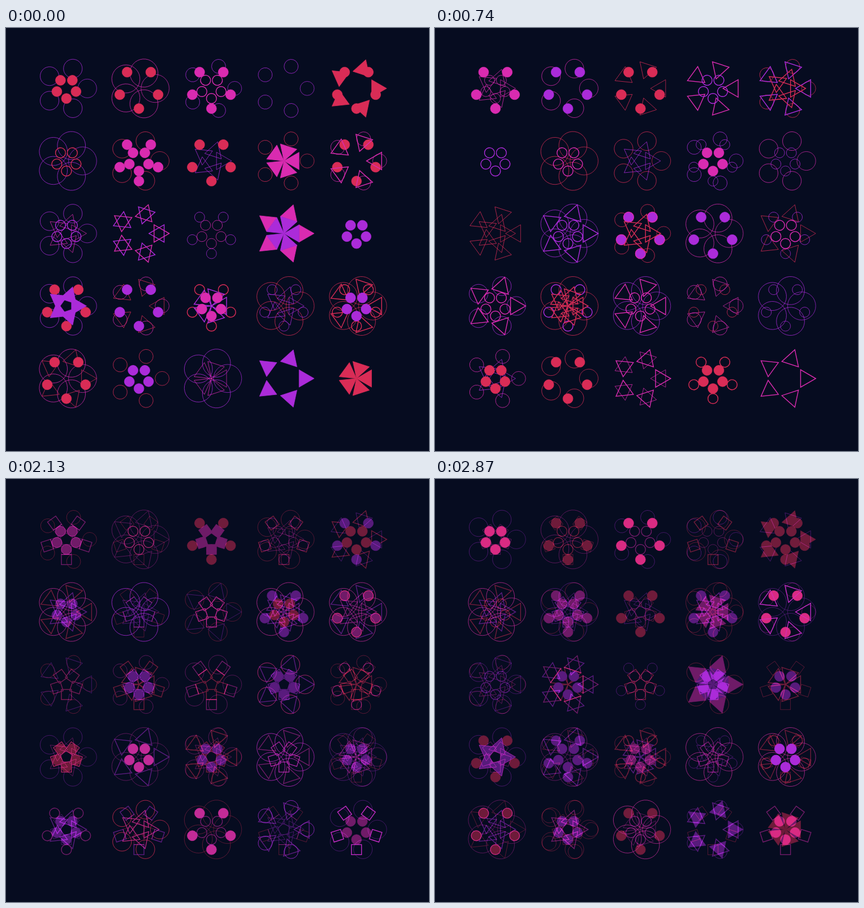
Animation, 748 px wide and 748 px high, one loop 2.96 s. Source, as an HTML page:

```html
<!DOCTYPE html>
<html lang="en">
<head>
<meta charset="utf-8">
<title>Crystal grid</title>
<style>
  html, body { margin: 0; width: 100%; height: 100%; overflow: hidden; background: #060c20; }
  svg { display: block; width: 100vw; height: 100vh; }
</style>
</head>
<body>
<svg id="stage" viewBox="0 0 1050 1050"></svg>
<script>
const NS = 'http://www.w3.org/2000/svg';
const BG = '#060c20';
const COLORS = { r: '#d92c56', p: '#d92bb0', u: '#ab2bd9' };
const SIZE = 150, PITCH = 180, SIDES = 5;
const HOLD = 650, FADE = 90, STEP = HOLD + FADE;

// Layer = shape + style + colour.
// 2 3 4: large circles; c s t v: circle, square, triangle out, triangle in
// (capital letters: outer ring). Styles: - thin, = thick, # filled.
const SCENES = [
  `3-u c#r | 2-p C#r | 4-u c=p C#p | 4-u | T#r C#r
   2-u c=r | 3-r C#p c#p | t-u C#r | 4-r v#p | 4-p C#r V=p
   3-u t-p c=u | V=u T=p | C-u c-p | T#p v#u | c#u
   3-u C#r t#u | 4-p V-r C#u | C=r v=u c#p | 2-r t-u C-u | 2-r V=r C=r c#u
   2-p T-r C#r | 4-r c#u | 2-u v-p | T#u | v#r`,
  `t-p c-p C#p | 3-p C#u | V-r C#r | V=p c=u | 4-r V=u t=r
   c=u | 2-r c=p | 3-r t-u | 4-u C-u c#p | 3-p c-u
   V-r t-r | 2-u T=u c=u | 4-r C#u C=p t=r | 2-p C#u | T-r C-u c=p
   3-u T=p c=p | 2-r C=u t=r v=r | 2-u V=p c=p | 4-p V-p C-r | 2-u C-u
   4-p t-u c#r | 3-r C#r | V-p T=p | C=r c#r | T=p`,
  `4-r c-p S=p | 2-p T-p c-u | s#p c#p | t-p C-u | T=r C#u
   2-u c#u | 2-u S-r | 3-r T-u s=p | 2-u v=u c#r | 2-r C=r t=p
   s=r s-p | 4-p S=r s=u | 3-p S=p | 3-p T=u | 4-r C=p s=r
   3-u s=r c#r | c#r | 3-p s=r c#u | 2-p s-u V=p | 3-p t-u v=p
   s-u c#u | 3-r t-r S=u | C#u | 4-u t-u s-u | 3-u S=u`,
  `s-p c#p | S-r c=r | C#r | 3-r c-p S=r | V-u c#r
   2-r V=r t=u | 2-u t-u s=u | s-r c-p | 2-r t=u C#u | 2-u V=u C#p
   4-r V-u | v=r c#u | s=r | 3-r s=u c#u | S-r v=r
   t-p s-p | 2-p T=u c#u | 4-r t-p V=r | 2-u s=p | 2-u S-r c#u
   t=u C=p | 3-r s-r t=p | 2-r C#r c=p | 4-u S-r V=u | S=p c#p`
];

function add(parent, tag, attrs) {
  const el = document.createElementNS(NS, tag);
  for (const key in attrs) el.setAttribute(key, attrs[key]);
  return parent.appendChild(el);
}

function drawShape(g, kind, turn) {
  const unit = SIZE / 6;
  const name = kind.toLowerCase();
  const dist = kind === name ? unit : 2 * unit;
  if (kind > '0' && kind < '9') {
    const r = 0.93 * SIZE / 2 / kind;
    add(g, 'circle', { cx: SIZE / 2 - r, r, transform: `rotate(${turn})` });
  } else if (name === 'c') {
    add(g, 'circle', { cy: dist, r: unit / 2, transform: `rotate(${turn})` });
  } else if (name === 's') {
    add(g, 'rect', {
      x: -unit / 2, y: dist - unit / 2, width: unit, height: unit,
      transform: `rotate(${turn})`
    });
  } else {
    const tip = name === 't' ? unit : -unit;
    const base = dist - tip / 2, half = unit * Math.sqrt(3) / 2;
    add(g, 'polygon', {
      points: `${dist + tip},0 ${base},${half} ${base},${-half}`,
      transform: `rotate(${turn})`
    });
  }
}

function drawLayer(cell, [kind, style, hue]) {
  const color = COLORS[hue];
  const g = add(cell, 'g', {
    fill: style === '#' ? color : 'none',
    stroke: color,
    'stroke-width': style === '=' ? 2 : 1,
    'stroke-miterlimit': 10
  });
  for (let k = 0; k < SIDES; k++) drawShape(g, kind, k * 360 / SIDES);
}

function drawScene(svg, text) {
  const scene = add(svg, 'g', {});
  add(scene, 'rect', { width: 1050, height: 1050, fill: BG });
  text.split(/[|\n]/).forEach((layers, i) => {
    const x = SIZE + PITCH * (i % 5), y = SIZE + PITCH * Math.floor(i / 5);
    const cell = add(scene, 'g', { transform: `translate(${x} ${y})` });
    layers.trim().split(' ').forEach(layer => drawLayer(cell, layer));
  });
  return scene;
}

const svg = document.getElementById('stage');
const scenes = SCENES.map(text => drawScene(svg, text));
let shown = '';

function render(time) {
  const count = scenes.length;
  const t = time % (STEP * count);
  const now = Math.floor(t / STEP), next = (now + 1) % count;
  const mixing = t % STEP >= HOLD;
  const key = now + '/' + mixing;
  if (key === shown) return;
  shown = key;
  // The later scene in the stack lies on top at half strength.
  const top = Math.max(now, next);
  scenes.forEach((scene, i) => {
    const visible = i === now || (mixing && i === next);
    scene.style.display = visible ? '' : 'none';
    scene.style.opacity = mixing && i === top ? 0.5 : 1;
  });
}

const start = performance.now();
function tick() {
  render(performance.now() - start);
  requestAnimationFrame(tick);
}
render(0);
requestAnimationFrame(tick);
</script>
</body>
</html>
```
